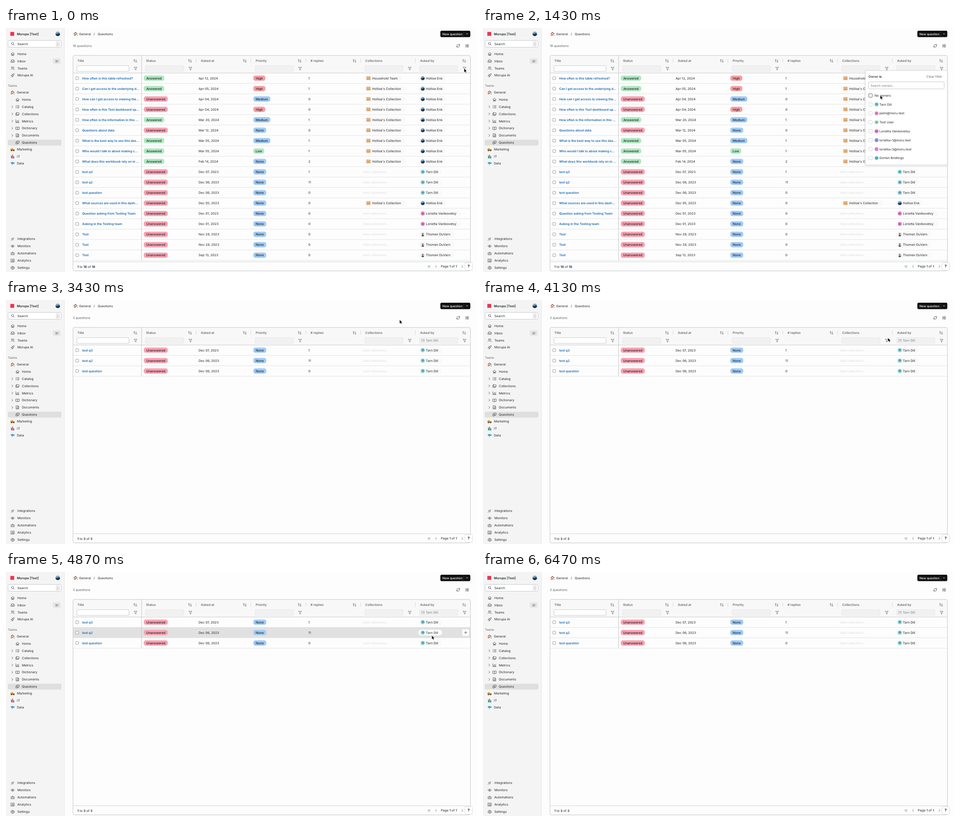
Write an HTML page that moves like this. It is 1037 by 540 pixels and loops after 6560 ms.

```html
<!DOCTYPE html>
<html lang="en">
<head>
<meta charset="utf-8">
<title>Questions table</title>
<style>
  html, body { margin: 0; width: 100%; height: 100%; overflow: hidden; background: #fdfdfd; }
  svg { display: block; width: 100vw; height: 100vh; }
  text { font-family: Inter, "Liberation Sans", sans-serif; text-rendering: geometricPrecision; white-space: pre; }
  .icon { fill: none; stroke-width: .8; stroke-linecap: round; stroke-linejoin: round; }
  .bg { fill: none; }
  .chip { fill: #f9f9f9; }
  .plus { display: none; }
  .row.hot .bg { fill: #e1e1e1; }
  .row.hot .chip { fill: #fff; }
  .row.hot .plus { display: inline; }
  .row.hot .hint { display: none; }
  .box { fill: #fff; stroke: #c6c8cb; stroke-width: .8; }
  .hot > .box { stroke: #33363a; }
</style>
</head>
<body>
<svg id="stage" viewBox="0 0 1037 540" preserveAspectRatio="none"></svg>
<script>
const LOOP = 6560, OPEN = 400, PICK = 2080, CLOSE = 3180, GONE = 5900;
const INK = '#202327', GREY = '#5a5e63', LINE = '#e2e3e5';
const ROW = 23.04, STEP = 19.77;

// Drawing helpers; y is the vertical middle of the text or icon
const text = (x, y, s, o = {}) =>
  `<text x="${x}" y="${y + 2.55}" font-size="${o.size || 7.05}" font-weight="${o.weight || 400}"` +
  ` fill="${o.fill || INK}" text-anchor="${o.anchor || 'start'}" class="${o.cls || ''}">${s}</text>`;
const rect = (x, y, w, h, fill, o = {}) =>
  `<rect x="${x}" y="${y}" width="${w}" height="${h}" rx="${o.r || 0}" fill="${fill}"` +
  ` stroke="${o.stroke || 'none'}" stroke-width="${o.sw || 1}" class="${o.cls || ''}"/>`;
const circle = (x, y, r, fill) => `<circle cx="${x}" cy="${y}" r="${r}" fill="${fill}"/>`;
const line = (x1, y1, x2, y2, c = LINE, w = 1) =>
  `<path d="M${x1} ${y1}L${x2} ${y2}" stroke="${c}" stroke-width="${w}"/>`;
const at = (x, y, s) => `<g transform="translate(${x} ${y})">${s}</g>`;
const icon = (name, x, y, c = '#3c4045') => at(x, y, `<path class="icon" stroke="${c}" d="${ICONS[name]}"/>`);

const ICONS = {
  home: 'M-3.5 0L0-3.3 3.5 0M-2.5-.8V3.2H2.5V-.8M-.7 3V.8H.7V3',
  inbox: 'M-3.5 0L-2.3-2.8H2.3L3.5 0V2.8H-3.5ZM-3.5 0H-1.3L-.6 1.2H.6L1.3 0H3.5',
  users: 'M-2.6-1.8a1.5 1.5 0 1 0 3 0a1.5 1.5 0 1 0-3 0M-3.8 3C-3.4.4 1.2.4 1.6 3M1.8-3.2C3.4-2.6 3.4-.8 1.8-.3M2.4.8Q3.6 1.4 3.8 3',
  spark: 'M-.8-2.6L.2-.2 2.6.8.2 1.6-.8 4-1.6 1.6-4 .8-1.6-.2ZM2.6-3.8V-1.6M1.5-2.7H3.7',
  list: 'M-3.6-2.5H-2.6M-3.6 0H-2.6M-3.6 2.5H-2.6M-.8-2.5H3.6M-.8 0H3.6M-.8 2.5H3.6',
  folders: 'M-2-3.2H0L.8-2.3H3.6V1.6H-2ZM-2-1.6H-3.6V3.2H2V1.6',
  metrics: 'M-3.6-3.2V3.2H3.6M-2 1L-.4-.9.9.3 3.2-2.4M-1.5 3V2M.6 3V1.8M2.6 3V.6',
  book: 'M0-2.2Q-1.4-3-3.8-2.8V2.6Q-1.4 2.4 0 3.1 1.4 2.4 3.8 2.6V-2.8Q1.4-3 0-2.2V3',
  doc: 'M-2.8-3.5H1L2.8-1.7V3.5H-2.8ZM1-3.5V-1.7H2.8M-1.3.2H1.3M-1.3 1.8H1.3',
  chat: 'M-.8-3.4H3.6V.6H2.6L1.4 1.8V.6H-.8ZM-.8-1.2H-3.6V2.6H-2.6V3.7L-1.4 2.6H1V1',
  plug: 'M-3.4 3.4L-1.8 1.8M-2.6 0L0 2.6 1.6 1.2-1.2-1.6ZM.1-1.4L1.6-2.8M1.3-.1L2.9-1.6',
  eye: 'M-3.8 0Q0-5 3.8 0 0 5-3.8 0M-1.2 0a1.2 1.2 0 1 0 2.4 0a1.2 1.2 0 1 0-2.4 0',
  bot: 'M-3.2-1.4H3.2V3H-3.2ZM0-1.4V-3.4M-1.2.2V1.2M1.2.2V1.2',
  bars: 'M-3.4-3.3H3.4V3.3H-3.4ZM-1.6 1.6V0M0 1.6V-1.6M1.6 1.6V-.6',
  gear: 'M-1.2 0a1.2 1.2 0 1 0 2.4 0a1.2 1.2 0 1 0-2.4 0M-.7-3.6H.7L1-2.5 2.3-1.8 3.4-2.1 3.8-.7 2.9 0 3.8.8 3.3 2.1 2.2 1.9 1 2.6.7 3.6H-.7L-1 2.6-2.2 1.9-3.3 2.1-3.8.8-2.9 0-3.8-.7-3.4-2.1-2.3-1.8-1-2.5Z',
  search: 'M-3.1-.6a2.5 2.5 0 1 0 5 0a2.5 2.5 0 1 0-5 0M1.3 1.3L3.2 3.2',
  right: 'M-1.2-2.3L1.2 0-1.2 2.3',
  left: 'M1.2-2.3L-1.2 0 1.2 2.3',
  first: 'M-.2-2.3L-2.4 0-.2 2.3M2.6-2.3L.4 0 2.6 2.3',
  down: 'M-1.9-1L0 1 1.9-1',
  sort: 'M-2 2.8V-3M-3.7-1.3L-2-3-.3-1.3M2-2.8V3M.3 1.3L2 3 3.7 1.3',
  funnel: 'M-3.2-3H3.2L.9.1V3.2L-.9 2.2V.1Z',
  refresh: 'M-3-.6A3.1 3.1 0 0 1 2.6-1.8L3.2-1.1M3.2-3V-1.1H1.3M3 .6A3.1 3.1 0 0 1-2.6 1.8L-3.2 1.1M-3.2 3V1.1H-1.3',
  sliders: 'M-3.6-2.4H.6M2.6-2.4H3.6M1.6-3.4V-1.4M-3.6 0H-2.2M0 0H3.6M-1.1-1V1M-3.6 2.4H.6M2.6 2.4H3.6M1.6 1.4V3.4',
  plus: 'M-3 0H3M0-3V3'
};

const hut = (x, y) => at(x, y,
  rect(-3, -.8, 6, 4.6, '#e9d9bd') + '<path d="M-4.4-.2L-.4-4.2 4.4-.2 3.4.6-.3-2.4-3.5.7Z" fill="#a5452f"/>' +
  rect(-2.1, .6, 1.7, 3.2, '#8a5a34') + rect(.5, .6, 1.8, 1.6, '#6fa8d0') + rect(-4.3, 2.6, 1.7, 1.3, '#5d9a48') + rect(2.6, 2.6, 1.7, 1.3, '#5d9a48'));
const cart = (x, y) => at(x, y,
  '<path d="M-5-1.6L-1-3.4 2-.8 5 .6 4.3 3H-3.4Z" fill="#e6a532"/><path d="M-4.6.6H4.6L4 2.4H-3.8Z" fill="#8f5327"/>' +
  circle(-2.6, 2.6, 1.2, '#4b3b31') + circle(2.5, 2.6, 1.2, '#4b3b31'));
const chart = (x, y) => at(x, y, rect(-4.3, -4.3, 8.6, 8.6, '#eef1f4') +
  rect(-3.5, -1.8, 2, 5.8, '#3aa25b') + rect(-1, -3.8, 2, 7.8, '#d8434a') + rect(1.6, -.4, 2, 4.4, '#3c78c8'));
const fish = (x, y) => at(x, y,
  '<path d="M-4.4-1.5Q-.5-5 3-1.5L4.6-3.2 4.3.4Q2 .2.6 1.3L-.6 4-1.6 1Q-3.6.8-4.4-1.5Z" fill="#3f9ccb"/><path d="M-4 0Q-2 1.4.4.2L-.2 1.6Q-2.8 1.6-4 0Z" fill="#a9d8ec"/>');
const folder = (x, y) => at(x, y, rect(-4.3, -3.8, 4.2, 3, '#c98c50', { r: .7 }) +
  rect(-4.5, -3, 9, 7, '#dfa66d', { r: .8 }) + rect(-4.5, -2.2, 9, 1, '#f0cfa6') + rect(.8, -3.8, 2.6, 1.6, '#c27d63'));
const scene = (x, y, r = 4.4) => circle(x, y, r, '#6fa5d2') +
  `<path d="M${x - r} ${y}A${r} ${r} 0 0 0 ${x + r} ${y}L${x + r * .3} ${y - r * .3} ${x - r * .4} ${y + r * .1}Z" fill="#28333e"/>`;
const figure = (x, y) => circle(x, y, 4.4, '#e3e5e8') + circle(x, y - 1.2, 1.6, '#8c6250') +
  `<path d="M${x - 2.9} ${y + 3.3}Q${x} ${y - 1.6} ${x + 2.9} ${y + 3.3}Q${x} ${y + 5.4} ${x - 2.9} ${y + 3.3}Z" fill="#39424f"/>`;
const badge = (x, y, s, c) => circle(x, y, 4.4, c) +
  `<text x="${x}" y="${y + 1.25}" font-size="3.5" font-weight="600" fill="#23303a" text-anchor="middle">${s}</text>`;

const PEOPLE = {
  H: { name: 'Hollise Enk', w: 59, pic: scene },
  T: { name: 'Tarn Dill', w: 52, pic: (x, y) => badge(x, y, 'TD', '#78cbdc') },
  L: { name: 'Lorietta Vanikovetsy', w: 94, pic: (x, y) => badge(x, y, 'LV', '#e07fbd') },
  D: { name: 'Thomen DuVarn', w: 79, pic: figure }
};
const OWNERS = [
  ['Tarn Dill', 'TD', '#78cbdc'], ['pelm@moru.test', 'P', '#e889c4'], ['Test User', 'TU', '#a4d9cb'],
  ['Lorietta Vanikovetsy', 'LV', '#e07fbd'], ['lorietta+1@moru.test', 'L', '#9492dc'],
  ['lorietta+3@moru.test', 'L', '#e889c4'], ['Gorten Bridlings', 'GB', '#70c9db'], ['Gorten Bridlings', 'GB', '#70c9db']
];
const PILLS = {
  Answered: [45, '#aee8bf'], Unanswered: [53, '#faa2b2'], High: [26.5, '#fa9ea2'],
  Medium: [37.5, '#a0cbf8'], None: [28.5, '#a0cbf8'], Low: [24, '#aee8bf']
};
const HOLLISE = ["Hollise's Collection", 91], HOUSE = ['Household Team', 82];

// title | answered | date | priority | replies | collection | person
const ROWS = `How often is this table refreshed?|A|Apr 12, 2024|High|1|T|H
Can I get access to the underlying d...|A|Apr 05, 2024|High|1|C|H
How can I get access to viewing the...|U|Apr 04, 2024|Medium|0|C|H
How often is this Test dashboard up...|U|Apr 04, 2024|High|0|C|H
How often is the information in this ...|A|Mar 20, 2024|Medium|1|C|H
Questions about data|U|Mar 12, 2024|None|0|C|H
What is the best way to use this das...|A|Mar 05, 2024|Medium|1|C|H
Who would I talk to about making c...|A|Mar 05, 2024|Low|1|C|H
What does this workbook rely on in ...|A|Feb 14, 2024|None|2|C|H
test q3|U|Dec 07, 2023|None|1||T
test q2|U|Dec 06, 2023|None|11||T
test question|U|Dec 06, 2023|None|0||T
What sources are used in this dash...|U|Dec 05, 2023|None|0|C|H
Question asking from Testing Team|U|Dec 01, 2023|None|0||L
Asking in the Testing team|U|Dec 01, 2023|None|0||L
Test|U|Nov 28, 2023|None|0||D
Test|U|Nov 28, 2023|None|0||D
Test|U|Sep 13, 2023|None|0||D`.split('\n').map(s => s.split('|'));

function pill(x, y, label) {
  const [w, c] = PILLS[label];
  return rect(x, y - 5.8, w, 11.6, c, { r: 4.6 }) + text(x + w / 2, y, label, { anchor: 'middle', weight: 500, size: 7 });
}

function row([title, status, date, priority, replies, coll, who], i) {
  const y = 111 + ROW * i, p = PEOPLE[who], c = coll === 'T' ? HOUSE : HOLLISE;
  return '<g class="row">' + rect(148, y - 11.5, 874.5, ROW, 'none', { cls: 'bg' }) +
    line(148, y + 11.6, 1022, y + 11.6) +
    rect(153.6, y - 3.1, 6.4, 6.4, '#fff', { r: 1.5, stroke: '#7b7f84', sw: .8 }) +
    text(167.7, y, title, { weight: 600, size: 6.9, fill: '#1465b0' }) +
    pill(303.3, y, status === 'A' ? 'Answered' : 'Unanswered') +
    text(424, y, date) + pill(544.5, y, priority) + text(665.8, y, replies) +
    (coll ? rect(789, y - 6.3, c[1], 12.6, '#f9f9f9', { r: 5, cls: 'chip' }) + folder(798, y) + text(806.3, y, c[0])
          : text(786, y, 'Add collections...', { fill: '#dcdddf', cls: 'hint' })) +
    rect(908, y - 6.3, p.w, 12.6, '#f9f9f9', { r: 6, cls: 'chip' }) + p.pic(917.6, y) + text(924.4, y, p.name) +
    `<g class="plus">${rect(1004, y - 7.5, 16, 15, '#fff', { r: 2.5, stroke: '#d5d6d8', sw: .6 }) + icon('plus', 1012, y)}</g></g>`;
}

function table(id, rows, filtered) {
  const n = rows.length, bottom = Math.min(517, 99.5 + ROW * n);
  const b = s => `<tspan font-weight="600">${s}</tspan>`;
  return `<g id="${id}">` + rows.map(row).join('') + line(298.5, 61, 298.5, bottom, '#c3c5c8') +
    rect(148, 517, 874.5, 20, '#fdfdfd') + line(148, 517.5, 1022, 517.5, '#d3d5d7') +
    text(157, 528, `${b(1)} to ${b(n)} of ${b(n)}`) +
    text(147, 39.8, `${n} questions`, { fill: GREY }) +
    (filtered ? text(914, 89.8, '(1) Tarn Dill', { fill: '#77797d' }) : '') + '</g>';
}

function sidebar() {
  const top = [['home', 57.3, 'Home'], ['inbox', 73.2, 'Inbox'], ['users', 89, 'Teams'], ['spark', 104.8, 'Morupa AI']];
  const team = [['home', 'Home'], ['list', 'Catalog'], ['folders', 'Collections'], ['metrics', 'Metrics'],
    ['book', 'Dictionary'], ['doc', 'Documents'], ['chat', 'Questions']];
  const foot = [['plug', 'Integrations'], ['eye', 'Monitors'], ['bot', 'Automations'], ['bars', 'Analytics'], ['gear', 'Settings']];
  let s = rect(0, 0, 129, 540, '#f4f4f4') + line(128.7, 0, 128.7, 540, '#e6e6e6');
  s += rect(9.5, 8.7, 8.6, 8.6, '#e8384f') + text(24, 13, 'Morupa [Test]', { weight: 600 }) + scene(114, 13, 5);
  s += rect(4.5, 27.5, 117, 15, '#fff', { r: 3, stroke: '#c2c4c7', sw: .9 }) + icon('search', 15, 35) + text(25, 35, 'Search') +
    rect(110.3, 30, 7.6, 10, '#f0f0f0', { r: 1.5, stroke: '#cfcfcf', sw: .6 }) + text(114.1, 35, '/', { anchor: 'middle', size: 6, fill: GREY });
  for (const [k, y, t] of top) s += icon(k, 14.7, y) + text(25, y, t);
  s += rect(103, 67.3, 17, 11.6, '#e5e5e5', { r: 3 }) + text(111.5, 73.2, '31', { anchor: 'middle', size: 6.3 });
  s += text(4.5, 127, 'Teams', { size: 6.4, fill: GREY }) + hut(14.5, 142.6) + text(24, 142.6, 'General');
  s += rect(4, 247.2, 118, 13, '#dfdfdf', { r: 3 });
  team.forEach(([k, t], i) => {
    const y = 158.5 + 15.84 * i;
    s += icon(k, 25.3, y) + text(35, y, t) + (i > 0 && i < 6 ? icon('right', 14, y) : '');
  });
  s += cart(14.5, 268.8) + text(24, 268.8, 'Marketing') + chart(14.5, 284.5) + text(24, 284.5, 'IT') +
    fish(14.5, 299.8) + text(24, 299.8, 'Data');
  foot.forEach(([k, t], i) => { const y = 466.8 + 16 * i; s += icon(k, 14.7, y) + text(25, y, t); });
  return s;
}

function toolbar() {
  return hut(153.3, 13) + text(161, 13, 'General') + text(193, 13, '/') + text(202, 13, 'Questions') +
    rect(956.3, 6, 66, 14.3, '#111', { r: 3 }) + line(1007.6, 6, 1007.6, 20.3, '#3c3c3c', .7) +
    text(961, 13.1, 'New question', { weight: 500, size: 6.7, fill: '#fff' }) + icon('down', 1015, 13.2, '#fff') +
    icon('refresh', 995.6, 39.5) + icon('sliders', 1015.2, 39.5);
}

function tableHead() {
  const names = ['Title', 'Status', 'Asked at', 'Priority', '# replies', 'Collections', 'Asked by'];
  let s = rect(148, 61, 874.5, 38.6, '#f8f8f8') + line(148, 99.7, 1022, 99.7, '#c9cbce');
  names.forEach((n, i) => {
    const x = i ? 308.3 + 120.7 * (i - 1) : 157;
    s += text(x, 72.8, n, { weight: 500, fill: '#55595e' });
    if (i !== 5) s += icon('sort', i ? x + 96.8 : 284.6, 72.8, '#606469');
    if (i > 1) s += line(x - 10.4, 67.5, x - 10.4, 76.5, '#d6d7d9');
    if (i === 2 || i === 4) return;
    s += i ? rect(x - .9, 83.4, 84, 12.6, '#f1f1f1', { r: 1, stroke: '#e4e5e6', sw: .8 })
           : rect(156, 83.4, 114.8, 12.6, '#fff', { r: 1, stroke: '#c3c5c8', sw: .9 });
    s += icon('funnel', i ? x + 97.8 : 285.4, 89.8, '#606469');
  });
  return s;
}

function frameAndPager() {
  return rect(147.5, 60.7, 875, 476.8, 'none', { r: 3, stroke: '#c3c5c8' }) +
    icon('first', 931, 527.8, GREY) + icon('left', 946.7, 527.8, GREY) + icon('right', 1005, 527.8, GREY) +
    text(957.3, 527.8, 'Page <tspan font-weight="500">1</tspan> of <tspan font-weight="500">1</tspan>') +
    rect(1010.3, 519, 16.7, 17, '#fff', { r: 3, stroke: '#cfd1d3', sw: .8 }) + text(1018.7, 527.5, '?', { weight: 700, size: 8.5, anchor: 'middle' });
}

function option(owner, y) {
  const box = rect(849.3, y - 3.9, 7.8, 7.8, '#fff', { r: 1.5, cls: 'box' });
  return `<g class="option" data-y="${y}">` + box +
    (owner ? badge(866.5, y, owner[1], owner[2]) + text(872.8, y, owner[0]) : text(862, y, 'No owners')) + '</g>';
}

function popover(id, picked) {
  const list = picked ? [null, ...OWNERS.slice(1)] : [null, ...OWNERS.slice(0, 7)];
  const top = picked ? 178.6 : 149.4, [name, tag, color] = OWNERS[0];
  return `<g id="${id}">` +
    `<rect x="841.7" y="94.2" width="180.6" height="${picked ? 238.3 : 208.8}" rx="2" fill="#fff" stroke="#cfd1d3" stroke-width=".8" filter="url(#shadow)"/>` +
    text(848.8, 107.8, 'Owner <tspan font-weight="700">is</tspan>', { weight: 500, size: 6.8 }) +
    text(1011, 107.8, 'Clear filter', { anchor: 'end', fill: '#66696e' }) +
    rect(849, 119.2, 166.3, 15.6, '#fff', { r: 1.5, stroke: '#bfc1c4', sw: .9 }) + text(853.3, 127, 'Search owners...', { size: 6.8, fill: '#77797d' }) +
    (picked ? rect(848.9, 145.1, 8.4, 8.4, '#111', { r: 1.6 }) +
      '<path class="icon" stroke="#fff" style="stroke-width:1.1" d="M851 149.4L852.6 151 855.3 147.8"/>' +
      badge(866.5, 149.4, tag, color) + text(872.8, 149.4, name) + line(842, 164.2, 1022, 164.2, '#e8e9ea') : '') +
    list.map((o, i) => option(o, top + STEP * i)).join('') + '</g>';
}

const stage = document.getElementById('stage');
stage.innerHTML =
  '<defs><filter id="shadow" x="-10%" y="-10%" width="120%" height="120%"><feDropShadow dx="0" dy="1" stdDeviation="1.6" flood-opacity=".16"/></filter></defs>' +
  rect(0, 0, 1037, 540, '#fdfdfd') + sidebar() + toolbar() + tableHead() +
  table('all', ROWS, false) + table('few', ROWS.filter(r => r[6] === 'T'), true) +
  frameAndPager() + popover('menu', false) + popover('picked', true) +
  '<path id="cursor" d="M0 0V8.7L2 6.9 3.3 9.9 4.9 9.2 3.6 6.3H6.3Z" fill="#000" stroke="#fff" stroke-width=".6"/>';

const $ = id => document.getElementById(id);
const show = (id, on) => $(id).setAttribute('visibility', on ? 'visible' : 'hidden');

// Pointer path: time, x, y
const PATH = [[0, 1008.6, 89.5], [720, 1008.6, 89.5], [1300, 874.5, 149], [1480, 874.5, 149], [1900, 852.6, 168.5],
  [2720, 852.6, 168.5], [3100, 866.5, 43.7], [3950, 866.5, 43.7], [4400, 937, 156.2], [4720, 937, 156.2],
  [5200, 938.7, 89], [5620, 938.7, 89], [GONE, 957, 8]];

function pointer(t) {
  const k = PATH.findIndex(p => p[0] > t);
  if (k < 0) return PATH[PATH.length - 1].slice(1);
  const [t0, x0, y0] = PATH[k - 1], [t1, x1, y1] = PATH[k];
  const u = (t - t0) / (t1 - t0), e = u * u * (3 - 2 * u);
  return [x0 + (x1 - x0) * e, y0 + (y1 - y0) * e];
}

const rows = [...document.querySelectorAll('#few .row')];
const options = [...document.querySelectorAll('.option')];

function draw(t) {
  const [x, y] = pointer(t), open = t >= OPEN && t < CLOSE, picked = t >= PICK;
  show('all', !picked);
  show('few', picked);
  show('menu', open && !picked);
  show('picked', open && picked);
  show('cursor', t < GONE);
  $('cursor').setAttribute('transform', `translate(${x} ${y})`);
  const hot = open || t >= GONE ? -1 : Math.floor((y - 99.5) / ROW);
  rows.forEach((r, i) => r.classList.toggle('hot', i === hot));
  options.forEach(o => o.classList.toggle('hot', open && x < 1015 && Math.abs(o.dataset.y - y) < 8));
}

const start = performance.now();
function tick() {
  draw((performance.now() - start) % LOOP);
  requestAnimationFrame(tick);
}
tick();
</script>
</body>
</html>
```
